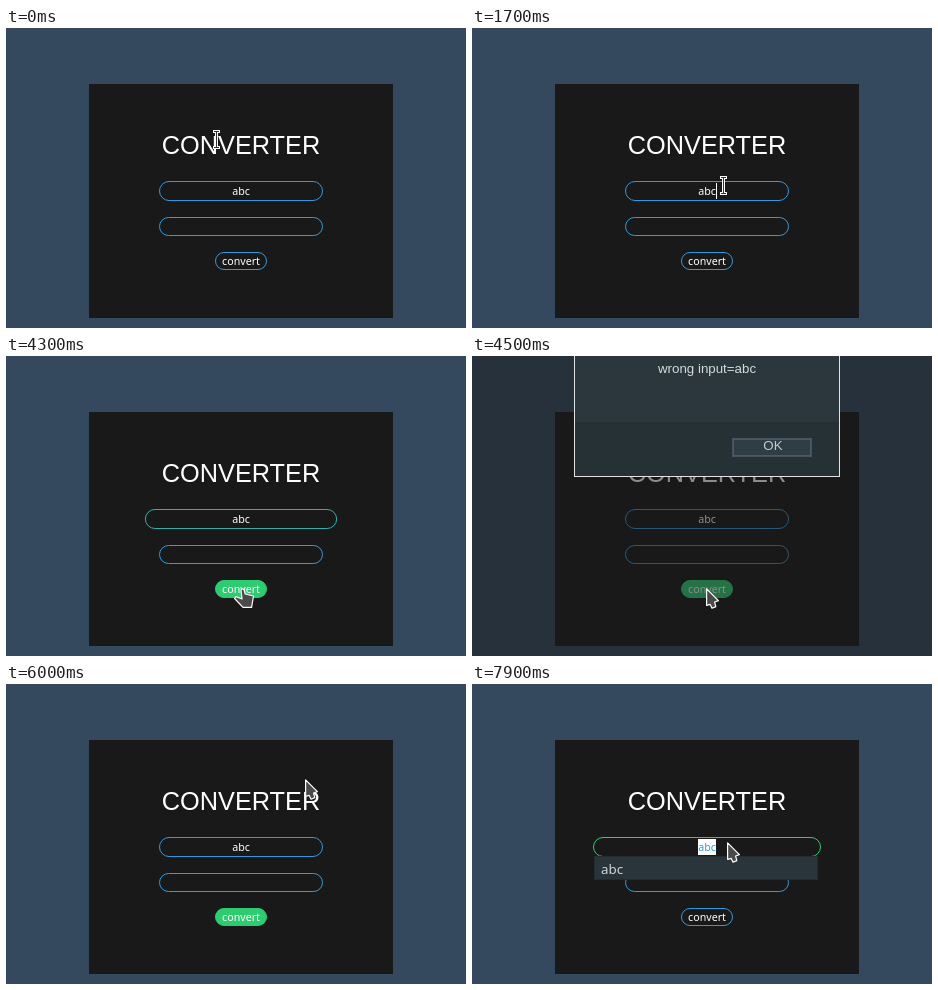
Animation of 460x300 px, one loop 8 s. Source, as an HTML page with a canvas:

```html
<!DOCTYPE html>
<html lang="en">
<head>
<meta charset="utf-8">
<title>Converter</title>
<style>
  html, body { margin: 0; width: 100%; height: 100%; overflow: hidden; background: #34495e; }
  canvas { display: block; width: 460px; height: 300px; }
</style>
</head>
<body>
<canvas id="stage" width="460" height="300"></canvas>
<script>
const ctx = document.getElementById('stage').getContext('2d');
const LOOP = 8000, STEP = 100, FADE = 250, CENTER = 235;
const SANS = '"Liberation Sans", Arial, sans-serif';
const UI = '"Noto Sans", "Open Sans", sans-serif';
const BLUE = [52, 152, 219], GREEN = [46, 204, 113];

const spots = {
  title: { x: 211, y: 112 },
  below: { x: 209, y: 132 },
  field: { x: 252, y: 158 },
  button: { x: 234, y: 232 },
  ok: { x: 299, y: 95 },
  top: { x: 299, y: 10 }
};
const moves = [
  { to: 'below', start: 100, end: 200 },
  { to: 'button', start: 300, end: 600 },
  { to: 'field', start: 600, end: 900 },
  { to: 'button', start: 1700, end: 2400 },
  { to: 'ok', start: 4900, end: 5800 },
  { to: 'top', start: 6100, end: 6800 },
  { to: 'field', start: 6900, end: 7500 }
];

const clamp = v => Math.min(1, Math.max(0, v));
const mix = (a, b, p) => a + (b - a) * p;
const rgb = (a, b, p) => `rgb(${a.map((v, i) => Math.round(mix(v, b[i], p)))})`;
const within = (t, a, b) => t >= a && t < b;
const easeOut = p => 1 - (1 - p) ** 2;

// CSS "ease": cubic-bezier(.25, .1, .25, 1)
function ease(x) {
  const bez = (a, b, s) => 3 * a * s * (1 - s) ** 2 + 3 * b * s * s * (1 - s) + s ** 3;
  let lo = 0, hi = 1;
  for (let i = 0; i < 20; i++) {
    const mid = (lo + hi) / 2;
    if (bez(.25, .25, mid) < x) lo = mid; else hi = mid;
  }
  return bez(.1, 1, hi);
}

// Progress of a transition switched on and off again
const toggle = (t, on, off) =>
  ease(clamp((t - on) / FADE)) - ease(clamp((t - off) / FADE));

function pointerAt(t) {
  let { x, y } = spots.title;
  for (const { to, start, end } of moves) {
    const p = easeOut(clamp((t - start) / (end - start)));
    x = mix(x, spots[to].x, p);
    y = mix(y, spots[to].y, p);
  }
  return [Math.round(x), Math.round(y)];
}

function text(str, x, y, size, font, color, align = 'center') {
  ctx.font = `${size}px ${font}`;
  ctx.textAlign = align;
  ctx.fillStyle = color;
  ctx.fillText(str, x, y);
}

function rect(x, y, w, h, color) {
  ctx.fillStyle = color;
  ctx.fillRect(x, y, w, h);
}

function outline(x, y, w, h, color) {
  ctx.strokeStyle = color;
  ctx.lineWidth = 1;
  ctx.strokeRect(x + .5, y + .5, w - 1, h - 1);
}

function pill(y, w, h, stroke, fill = 'transparent') {
  ctx.beginPath();
  ctx.roundRect(CENTER - w / 2 + .5, y + .5, w - 1, h - 1, (h - 1) / 2);
  ctx.fillStyle = fill;
  ctx.fill();
  ctx.strokeStyle = stroke;
  ctx.lineWidth = 1;
  ctx.stroke();
}

function shape(...points) {
  ctx.beginPath();
  points.forEach(([x, y]) => ctx.lineTo(x, y));
  ctx.closePath();
  ctx.fillStyle = '#4a4a4a';
  ctx.strokeStyle = '#fff';
  ctx.lineWidth = 1.2;
  ctx.lineJoin = 'round';
  ctx.fill();
  ctx.stroke();
}

function bar(size, half, width, color) {
  ctx.beginPath();
  for (const y of [-size, size]) {
    ctx.moveTo(-half, y);
    ctx.lineTo(half, y);
  }
  ctx.moveTo(0, -size);
  ctx.lineTo(0, size);
  ctx.lineWidth = width;
  ctx.strokeStyle = color;
  ctx.stroke();
}

const pointers = {
  arrow: () => shape([.6, .8], [12.4, 12.6], [8.6, 14], [9.8, 18.6], [6, 20.2], [4.2, 16.4], [.6, 17.4]),
  hand: () => shape([1, 2], [2.5, .8], [4, 1.5], [5.2, 6], [13.5, 8], [11.6, 19.4],
    [3, 19.4], [-5.4, 10.5], [-4, 8.6], [2, 11]),
  beam() {
    ctx.translate(-.5, -.5);
    bar(8, 3.5, 3, '#fff');
    bar(8, 2.5, 1, '#333');
  }
};

function pointerKind(x, y) {
  const over = (top, width, height) =>
    Math.abs(x - CENTER) <= width / 2 && y >= top && y <= top + height;
  if (over(224, 52, 18)) return 'hand';
  return over(100, 158, 40) || over(153, 164, 20) || over(189, 164, 19) ? 'beam' : 'arrow';
}

function drawAlert() {
  rect(0, 0, 460, 300, 'rgba(26,26,26,.5)');
  rect(102, 0, 266, 66, '#2b373d');
  rect(102, 66, 266, 55, '#263136');
  outline(102, -2, 266, 123, '#dfe3e5');
  text('wrong input=abc', CENTER, 17, 13.33, SANS, '#d3dadd');
  rect(260, 82, 80, 19, '#2f3d44');
  outline(260, 82, 80, 19, '#45545c');
  outline(261, 83, 78, 17, '#4b5b63');
  text('OK', 301, 94, 13.33, SANS, '#c3cacd');
}

function drawSuggestions() {
  rect(122, 172, 224, 24, '#2a353b');
  outline(122, 172, 224, 24, '#232c31');
  text('abc', 129, 190, 13.33, UI, '#cfd5d8', 'left');
}

function draw(t) {
  const focus = toggle(t, 1700, 4219) + toggle(t, 7640, LOOP);
  const hover = toggle(t, 2590, 6020);
  const caret = within(t, 1700, 2200) || within(t, 2700, 3200);
  const selected = t >= 7700;
  const popup = t >= 7900;
  const alert = within(t, 4500, 6000);

  rect(0, 0, 460, 300, '#34495e');
  rect(83, 56, 304, 234, '#191919');
  text('CONVERTER', CENTER, 126, 25.3, SANS, '#fff');

  pill(153, mix(164, 228, focus), 20, rgb(BLUE, GREEN, focus));
  if (selected) rect(226, 155, 18, 16, '#fff');
  text('abc', CENTER, 167, 10.67, UI, selected ? rgb(BLUE, BLUE, 0) : '#fff');
  if (caret) rect(244, 155, 1, 16, '#fff');

  pill(189, 164, 19, rgb(BLUE, BLUE, 0));
  pill(224, 52, 18, rgb(BLUE, GREEN, hover), `rgba(${GREEN},${hover})`);
  text('convert', CENTER, 237, 10.67, UI, '#fff');

  if (popup) drawSuggestions();
  if (alert) drawAlert();

  const [x, y] = pointerAt(t);
  ctx.save();
  ctx.translate(popup ? x + 3 : x, y);
  pointers[alert || popup ? 'arrow' : pointerKind(x, y)]();
  ctx.restore();
}

const start = performance.now();
function tick() {
  const t = (performance.now() - start) % LOOP;
  draw(Math.floor(t / STEP) * STEP);
  requestAnimationFrame(tick);
}
tick();
</script>
</body>
</html>
```
